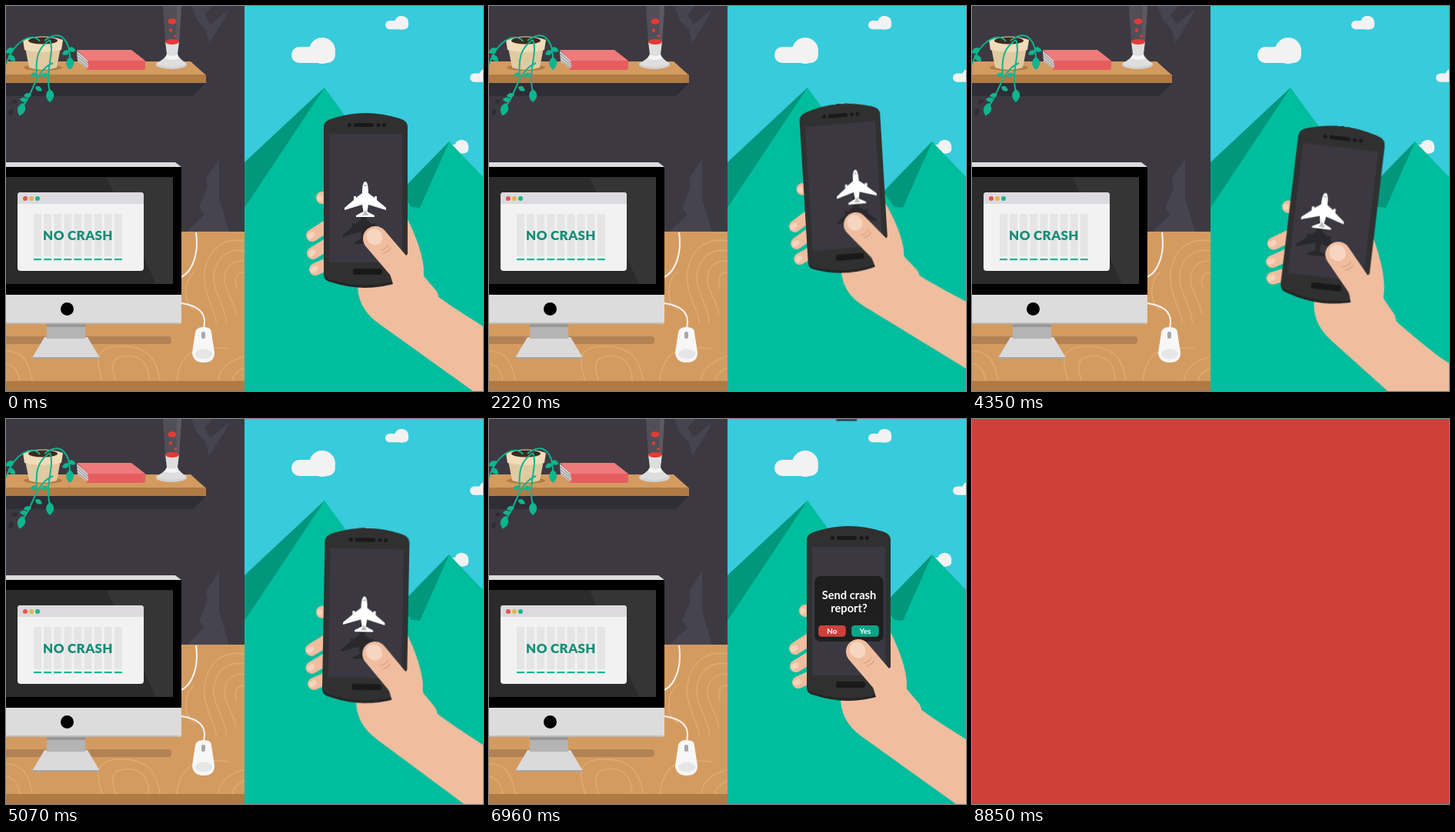
An HTML page without scripts for the animation above (8940 ms loop, 620x500 px).

```html
<!DOCTYPE html>
<html lang="en">
<head>
<meta charset="utf-8">
<title>No crash</title>
<style>
html, body { margin: 0; width: 100%; height: 100%; overflow: hidden; background: #3d3942; }
svg { display: block; width: 100vw; height: 100vh; }
text { font-family: Lato, "Open Sans", sans-serif; text-anchor: middle; }

.hand, .plane, .thumb, .dialog, .flood { animation: 8.94s infinite ease-in-out; }
.hand { transform-origin: 467.5px 251.5px; animation-name: tilt; }
.plane { animation-name: fly; }
.thumb { animation-name: reach; }
.dialog { transform-origin: 468px 247px; animation-name: pop; }
.flood { transform-origin: 443px 275px; animation-name: flood; }

@keyframes tilt {
  0%, 59.73%, 100% { transform: matrix(1, 0, 0, 1, 0, 0); }
  11.07% { transform: matrix(1.027, .14, -.185, 1.02, -5, 20.6); }
  24.83% { transform: matrix(.958, -.08, .058, .965, -6, -15.8); }
  48.66% { transform: matrix(1.027, .12, -.12, 1.01, 1.5, 18.5); }
}
@keyframes fly {
  0%, 59.73% { transform: translate(467px, 252px); }
  11.07% { transform: translate(451px, 249px); }
  24.83% { transform: translate(484px, 253px); }
  48.66% { transform: translate(455.5px, 250px); }
  62.75% { transform: translate(467px, 252px); animation-timing-function: cubic-bezier(.33, 0, .67, .33); }
  70.47%, 100% { transform: translate(467px, -61px) scale(1.12); }
}
@keyframes reach {
  0%, 83.5% { transform: translate(0, 0); }
  88.4%, 100% { transform: translate(-27px, -29px); }
}
@keyframes pop {
  0%, 73.4% { transform: scale(0); }
  77% { transform: scale(1.08); }
  79%, 86.5% { transform: scale(1); }
  88.4%, 100% { transform: rotate(-1.8deg); }
}
@keyframes flood {
  0%, 93.5% { transform: scale(0); animation-timing-function: ease-in; }
  98.9%, 100% { transform: scale(1); }
}
</style>
</head>
<body>
<svg viewBox="0 0 620 500" preserveAspectRatio="none">
<defs>
  <g id="cloud"><rect width="57" height="21" rx="10.5"/><circle cx="40" cy="5" r="17"/></g>
  <path id="jet" d="M0-24C3-24 4-17 4-9L12-3V-5H15V0L27 10V13L4 6L2.5 15L12 20V22H-12V20L-2.5 15L-4 6L-27 13V10L-15 0V-5H-12V-3L-4-9C-4-17-3-24 0-24Z"/>
  <path id="leaf" d="M0 0C8 5 6 12 0 17C-6 12-7 5 0 0Z"/>
  <pattern id="bars" x="36" width="13.1" height="70" y="268" patternUnits="userSpaceOnUse">
    <rect y="2" width="10" height="55" fill="#e5e5e5"/><rect y="60" width="10" height="2.2" fill="#0fb593"/>
  </pattern>
  <clipPath id="desk"><rect y="293" width="310" height="194"/></clipPath>
</defs>

<!-- room -->
<rect width="310" height="500" fill="#3d3942"/>
<path d="M241 0H268L258 12L266 24L290 4L283 18L264 48L260 31L248 18ZM277 198V250L290 293H235L258 271L251 262L262 236L260 224Z" fill="#46444e"/>

<!-- shelf -->
<path d="M0 100H260L243 117H0Z" fill="#2f2d36"/>
<path d="M0 72H240L260 90H0Z" fill="#d49b60"/>
<path d="M0 89H260V100H0Z" fill="#b07a45"/>

<!-- pot -->
<ellipse cx="48" cy="80" rx="25" ry="4" fill="#b07a45"/>
<path d="M25 54H71L66 80Q48 86 30 80Z" fill="#e0caa2"/>
<path d="M22 44Q48 35 74 44L72 57Q48 63 24 57Z" fill="#f0dcb9"/>
<ellipse cx="48" cy="45" rx="19" ry="4.5" fill="#3c2a22"/>
<g fill="#2f2d36">
  <use href="#leaf" transform="translate(8 133) rotate(20) scale(.6)"/>
  <use href="#leaf" transform="translate(15 122) rotate(60) scale(.5)"/>
</g>
<g fill="none" stroke="#0eb58e" stroke-width="2">
  <path d="M44 46C36 34 12 42 0 76M50 45C72 28 84 46 83 72M57 44C64 60 50 84 57 112M61 74C38 84 36 112 22 130M57 44C42 54 38 66 40 92"/>
</g>
<g fill="#0eb58e">
  <use href="#leaf" transform="translate(57 108)"/>
  <use href="#leaf" transform="translate(22 126) rotate(15)"/>
  <use href="#leaf" transform="translate(83 66)"/>
  <use href="#leaf" transform="translate(10 55) rotate(60) scale(.7)"/>
  <use href="#leaf" transform="translate(3 64) rotate(-50) scale(.7)"/>
  <use href="#leaf" transform="translate(81 55) rotate(-70) scale(.6)"/>
  <use href="#leaf" transform="translate(82 58) rotate(60) scale(.6)"/>
  <use href="#leaf" transform="translate(40 88) rotate(75) scale(.5)"/>
  <use href="#leaf" transform="translate(38 105) rotate(-60) scale(.6)"/>
  <use href="#leaf" transform="translate(33 115) rotate(80) scale(.6)"/>
  <use href="#leaf" transform="translate(54 88) rotate(70) scale(.55)"/>
  <use href="#leaf" transform="translate(28 122) rotate(95) scale(.6)"/>
</g>

<!-- book -->
<path d="M92 58L107 71V82L93 72Z" fill="#d4d0d0"/>
<path d="M93 62L106 74M93 66L106 77M93 70L106 80" stroke="#8d898e" stroke-width="1"/>
<path d="M92 57H163L181 71H106Z" fill="#ee7a7a"/>
<path d="M106 71H181V80Q181 83 178 83H104L107 79Z" fill="#e65d60"/>

<!-- lamp -->
<path d="M204 0H228L225 47H207Z" fill="#514e57"/>
<path d="M222 0H228L225 47H221Z" fill="#5c5962"/>
<g fill="#e23b36">
  <ellipse cx="216" cy="20" rx="5.5" ry="3.8"/><circle cx="214" cy="31.5" r="2.2"/><circle cx="220" cy="39" r="1.8"/>
</g>
<ellipse cx="215" cy="76" rx="20" ry="6" fill="#d2d2d2"/>
<path d="M207 46H225L223 63Q225 68 235 75Q215 83 195 75Q207 68 209 63Z" fill="#dedede"/>
<path d="M209 63Q216 67 223 63L225 68Q216 72 206 68Z" fill="#f4f4f4"/>
<ellipse cx="216" cy="46.5" rx="9" ry="3.5" fill="#e23b36"/>

<!-- desk -->
<rect y="293" width="310" height="207" fill="#d49b60"/>
<g clip-path="url(#desk)" fill="none" stroke="#dfaa70" stroke-width="1.6">
  <path d="M310 305C280 300 262 318 258 345S275 400 273 412M310 318C285 314 272 330 270 350S288 395 286 412M310 331C294 330 284 340 284 355S300 390 298 400M310 346C300 346 296 354 300 366"/>
  <path d="M245 345C228 360 232 390 246 395M222 487C226 450 245 440 290 445M200 487C196 455 180 440 145 442S120 470 125 487M186 487C186 462 172 452 152 455S140 475 142 487M0 448C20 448 30 460 34 487M0 464C10 466 16 474 18 487M310 455C285 462 276 475 276 487M310 470C300 474 295 480 294 487"/>
</g>
<rect y="487" width="310" height="13" fill="#b07a45"/>
<rect x="-10" y="429" width="225" height="10" rx="4" fill="#b38254"/>

<!-- mouse -->
<path d="M247 294C251 322 242 345 228 352M228 386C248 389 262 397 257 418" fill="none" stroke="#f4f4f4" stroke-width="2"/>
<path d="M246 424Q247 417 257 417T267 424L271 450Q271 463 257 463T242 450Z" fill="#f7f7f7"/>
<rect x="254" y="423" width="5" height="9" rx="2" fill="#a8a8a8"/>
<ellipse cx="257" cy="452" rx="11" ry="6.5" fill="#e6e6e6"/>

<!-- monitor -->
<path d="M53 413H103V431H53Z" fill="#b4b4b4"/>
<path d="M53 413H103V417H53Z" fill="#979797"/>
<path d="M50 430H106L122 457H34Z" fill="#dadada"/>
<path d="M53 429H103V432H53Z" fill="#b4b4b4"/>
<path d="M34 456H122V458H34Z" fill="#a6a6a6"/>
<path d="M0 203H220L228 209H0Z" fill="#dcdcdc"/>
<path d="M0 209H228V376H0Z"/>
<path d="M0 375H228V409Q228 413 224 413H0Z" fill="#dcdcdc"/>
<path d="M0 411H226L224 413H0Z" fill="#bdbdbd"/>
<circle cx="79.500" cy="393.500" r="8.500"/>
<path d="M0 222H217V361H0Z" fill="#2b2b2b"/>
<path d="M131 223H217V361H195Z" fill="#353535"/>
<rect x="15" y="242" width="164" height="102" rx="4" fill="#f2f2f2"/>
<path d="M15 257V246Q15 242 19 242H175Q179 242 179 246V257Z" fill="#dcdade"/>
<circle cx="25" cy="250" r="3" fill="#e5564e"/>
<circle cx="33" cy="250" r="3" fill="#e3b64b"/>
<circle cx="41" cy="250" r="3" fill="#1bb58f"/>
<rect x="36" y="268" width="116" height="66" fill="url(#bars)"/>
<text x="93.500" y="304" font-size="17" font-weight="900" letter-spacing=".35" fill="#128c76">NO CRASH</text>

<!-- landscape -->
<rect x="310" width="310" height="500" fill="#37cbdb"/>
<g fill="#f2f2f2">
  <use href="#cloud" x="371" y="53"/>
  <use href="#cloud" transform="translate(493 19) scale(.53)"/>
  <use href="#cloud" transform="translate(603 87.500) scale(.53)"/>
  <use href="#cloud" transform="translate(571 180) scale(.53)"/>
</g>
<path d="M576 176L620 222V500H500V254Z" fill="#00bd9d"/>
<path d="M576 176L538 262L500 258V254Z" fill="#00977d"/>
<path d="M414 106L527 261L620 500H310V204Z" fill="#00bd9d"/>
<path d="M414 106L310 203V262Z" fill="#00977d"/>

<!-- phone in hand -->
<g class="hand">
  <g fill="#f0bd9f">
    <path d="M521 275Q541 315 543 342C541 368 558 376 620 416L780 500V624L484 412Q456 392 457 360Z"/>
    <g stroke="#f0bd9f" stroke-width="16" stroke-linecap="round">
      <path d="M411 249H425M398 298L420 284M399 321L422 307M402 342L422 333"/>
    </g>
  </g>
  <g stroke="#f6d3bd" stroke-width="7" stroke-linecap="round">
    <path d="M408 249V250M395 299L398 297M396 322L399 320M399 343L402 341"/>
  </g>
  <path d="M413 158Q413 149 425 146Q467 134 511 146Q522 149 522 158V349Q522 356 510 359Q467 373 424 359Q413 357 413 349Z" fill="#252525"/>
  <path d="M413 157Q413 149 425 146Q467 132 511 146Q522 149 522 157V346Q522 353 510 356Q467 369 424 356Q413 354 413 346Z" fill="#303030"/>
  <rect x="420" y="166" width="95" height="167" fill="#3b3842"/>
  <g fill="#191919">
    <rect x="452" y="152" width="26" height="5" rx="2"/>
    <circle cx="446.500" cy="154.500" r="2.500"/><circle cx="484" cy="154.500" r="2.500"/><circle cx="491.500" cy="154.500" r="2.500"/>
    <rect x="451" y="341" width="38" height="8" rx="3"/>
  </g>

  <g class="plane">
    <use href="#jet" x="-2" y="35" fill="#222" opacity=".72"/>
    <use href="#jet" fill="#fff"/>
    <path d="M-1.500-20H1.500L2-18H-2ZM-4 20L0 13L4 20Z" fill="#bbb"/>
  </g>

  <g class="dialog">
    <rect x="425.500" y="206" width="85" height="81" rx="7" fill="#1f1f1f"/>
    <g fill="#fff" font-weight="700">
      <text x="468" y="235" font-size="14">Send crash</text>
      <text x="468" y="251" font-size="14">report?</text>
      <rect x="430" y="267" width="34" height="14" rx="4" fill="#cf403b"/>
      <rect x="471" y="267" width="34" height="14" rx="4" fill="#0ba488"/>
      <text x="447" y="277.500" font-size="9.500">No</text>
      <text x="488" y="277.500" font-size="9.500">Yes</text>
    </g>
  </g>

  <path d="M522 322L499 348L503 361Q506 374 530 380L543 350Z" fill="#f0bd9f"/>
  <g class="thumb" fill="none" stroke-linecap="round">
    <path d="M480 302L546 379" stroke="#f0bd9f" stroke-width="32"/>
    <ellipse cx="479" cy="300" rx="10" ry="11" fill="#f6d6c1" transform="rotate(-40 479 300)"/>
    <path d="M487 317Q494 316 497 310M491 321Q498 319 500 314" stroke="#dd9c7e" stroke-width="1.200"/>
  </g>
</g>

<circle class="flood" cx="443" cy="275" r="530" fill="#cf403b"/>
</svg>
</body>
</html>
```
